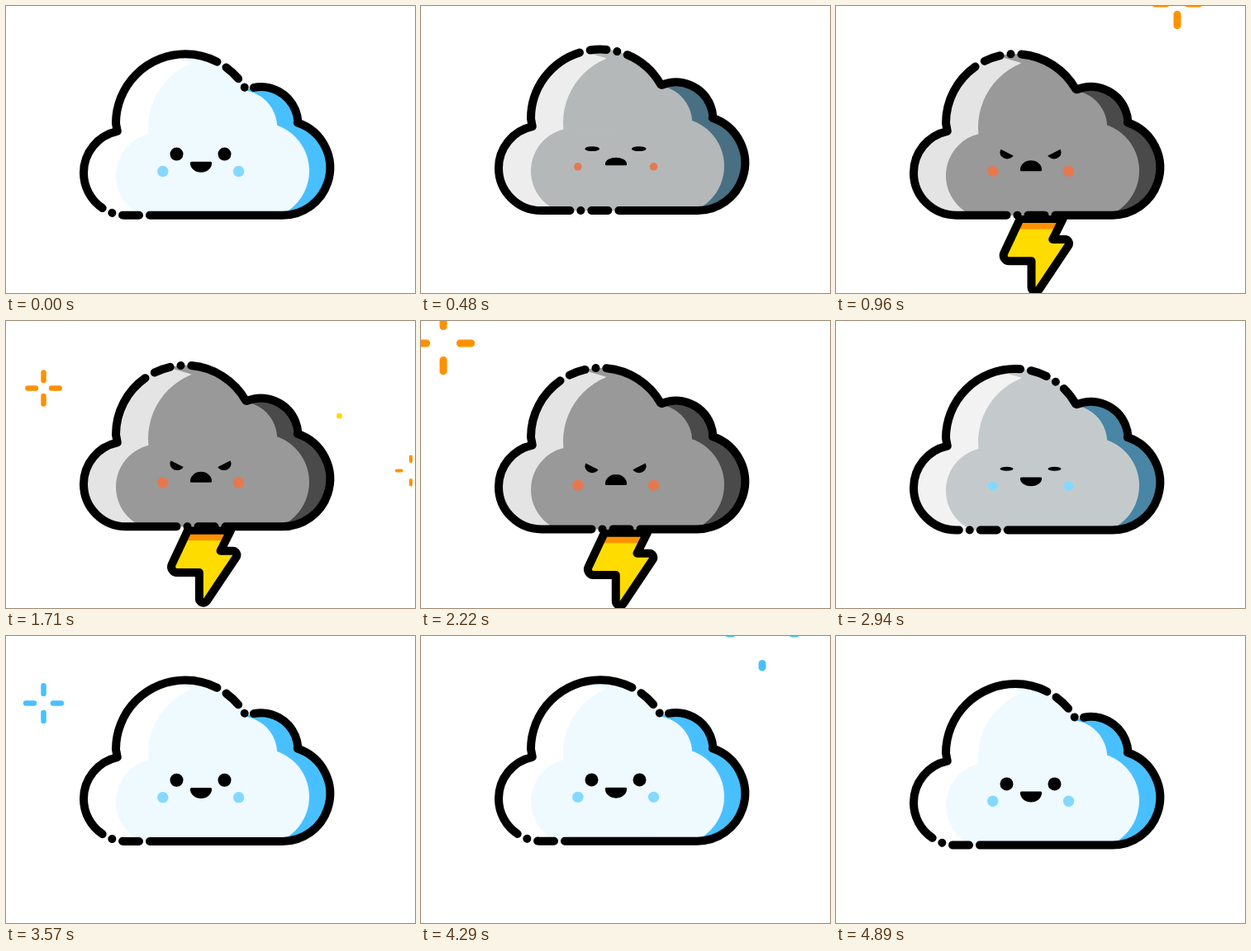
Animation, 495 px wide and 348 px high, one loop 4.92 s. Source, as an HTML page with a canvas:

```html
<!DOCTYPE html>
<html lang="en">
<head>
<meta charset="utf-8">
<title>Cloud mood</title>
<style>
html, body { margin: 0; width: 100%; height: 100%; overflow: hidden; background: #fff; }
canvas { display: block; }
</style>
</head>
<body>
<canvas id="stage" width="495" height="348"></canvas>
<script>
const ctx = document.getElementById('stage').getContext('2d');
const W = 495, H = 348, STEP = 30, FRAMES = 164;
const TAU = Math.PI * 2;
const FLOOR = 253.4; // resting height of the cloud's base line

const CALM = { left: [255, 255, 255], body: [238, 250, 255], right: [72, 192, 255] };
const ANGRY = { left: [228, 228, 228], body: [153, 153, 153], right: [74, 74, 74] };
const BLUE = '#48c0ff', ORANGE = '#ff9100', YELLOW = '#ffdc00';

const clamp = x => Math.min(1, Math.max(0, x));
const smooth = x => { x = clamp(x); return x * x * (3 - 2 * x); };
const lerp = (a, b, k) => a + (b - a) * k;
const mix = (a, b, k) => `rgb(${a.map((v, i) => Math.round(lerp(v, b[i], k)))})`;
// Rises over a..b, falls over c..d
const swell = (f, a, b, c, d) => smooth((f - a) / (b - a)) - smooth((f - c) / (d - c));

function disc(x, y, rx, ry = rx) {
  ctx.beginPath();
  ctx.ellipse(x, y, rx, ry, 0, 0, TAU);
  ctx.fill();
}

// Frames at which the cloud is lowest
const LOWS = [-35, 2, 34.5, 68.5, 101, 129, 166];

function bob(f) {
  const i = LOWS.findIndex(low => low > f);
  const phase = (f - LOWS[i - 1]) / (LOWS[i] - LOWS[i - 1]);
  return 250.8 + 3.1 * Math.cos(phase * TAU) - FLOOR;
}

function arcDeg(cx, cy, r, from, to) {
  ctx.arc(cx, cy, r, from * TAU / 360, to * TAU / 360);
}

function cloudPath() {
  ctx.beginPath();
  ctx.moveTo(334.5, 253.5);
  ctx.lineTo(145.5, 253.5);
  arcDeg(145.5, 202, 51.5, 90, 258);
  arcDeg(217, 142, 84, 180, 330.4);
  arcDeg(308.5, 142.8, 45, -112.4, -3.5);
  arcDeg(334.5, 195.8, 57.7, -71.5, 90);
  ctx.closePath();
}

function drawCloud(tone, shift) {
  const [left, body, right] = ['left', 'body', 'right'].map(k => mix(CALM[k], ANGRY[k], tone));
  ctx.save();
  cloudPath();
  ctx.clip();
  ctx.fillStyle = left;
  ctx.fillRect(80, 40, 330, 220);

  ctx.fillStyle = body;
  disc(185, 205.5, 52);
  disc(256, 147, 84);
  ctx.fillRect(184, 154, 120, 110);
  ctx.beginPath();
  ctx.moveTo(203, 62.5);
  ctx.lineTo(225, 69);
  ctx.lineTo(240, 50);
  ctx.lineTo(203, 50);
  ctx.fill();
  ctx.fillRect(224, 50, 70, 40);

  ctx.fillStyle = right;
  ctx.fillRect(291, 85, 120, 180);
  ctx.fillStyle = body;
  disc(283, 147, 45.2);
  disc(308.5, 199.5, 58.5);
  ctx.restore();

  const gap = [13, 20, 13, 0.01, 13];
  ctx.save();
  cloudPath();
  ctx.lineWidth = 10;
  ctx.lineCap = ctx.lineJoin = 'round';
  ctx.strokeStyle = '#000';
  ctx.setLineDash([301.7, ...gap, 401.4, ...gap]);
  ctx.lineDashOffset = shift - 219.5;
  ctx.stroke();
  ctx.restore();
}

function drawEye(x, side, tone) {
  const open = Math.abs(1 - 2 * tone);
  const ry = Math.max(2.5, 8 * open);
  ctx.save();
  if (tone > 0.5) {
    ctx.translate(x, 179.3 - 2 * open);
    ctx.scale(side, 1);
    const lid = lerp(-10, 0, open);
    ctx.beginPath();
    ctx.moveTo(-12, lid - 6.3);
    ctx.lineTo(12, lid + 6);
    ctx.lineTo(12, 14);
    ctx.lineTo(-12, 14);
    ctx.clip();
    disc(0.7, 0, 8.8, ry);
  } else {
    disc(x, 179.3, 8, ry);
  }
  ctx.restore();
}

function drawFace(tone, frown) {
  ctx.fillStyle = frown > 0.5 ? '#e67850' : '#85d8ff';
  const r = 6.7 * Math.max(0.2, Math.min(1, Math.abs(1 - 2 * frown) * 1.1));
  disc(189.8, 200.2, r);
  disc(281.6, 200.2, r);

  ctx.fillStyle = ctx.strokeStyle = '#000';
  drawEye(206.5, 1, tone);
  drawEye(264.5, -1, tone);

  const bend = 1 - 2 * frown;
  ctx.beginPath();
  ctx.ellipse(236, lerp(190, 198.6, frown), 11.6, Math.abs(bend) * 10, 0, 0, Math.PI, bend < 0);
  ctx.closePath();
  ctx.lineWidth = 3;
  ctx.lineJoin = 'round';
  ctx.fill();
  ctx.stroke();
}

function boltPath() {
  ctx.beginPath();
  ctx.moveTo(220, 253.5);
  ctx.arcTo(196, 304.8, 233.8, 304.8, 7);
  ctx.lineTo(233.8, 304.8);
  ctx.arcTo(233.8, 353, 283.6, 278.5, 5);
  ctx.arcTo(283.6, 278.5, 259.5, 278.5, 5);
  ctx.lineTo(259.5, 278.5);
  ctx.lineTo(272, 253.5);
  ctx.closePath();
}

function drawBolt(out, lift) {
  if (out <= 0) return;
  const sway = lift + FLOOR - 249;
  ctx.save();
  ctx.translate(0.6 * sway, sway - 100 * (1 - out));
  ctx.save();
  boltPath();
  ctx.clip();
  ctx.fillStyle = YELLOW;
  ctx.fillRect(180, 250, 120, 110);
  ctx.fillStyle = ORANGE;
  ctx.fillRect(180, 250, 120, 16);
  ctx.restore();
  boltPath();
  ctx.lineWidth = 10;
  ctx.lineJoin = 'round';
  ctx.strokeStyle = '#000';
  ctx.stroke();
  ctx.restore();
}

// Centre, scale, then the starting frames of the orange and the blue burst
const BURSTS = [
  [413, -3, 1, 26, 129.5],
  [490, 181.5, 0.46, 47, 101],
  [45.5, 81.5, 0.72, 51, 112],
  [27, 27, 1, 65.5, 148]
];

function drawBurst(x, y, size, age, color) {
  const p = age / 15;
  if (p < 0 || p >= 1) return;
  const outer = 41.5 * (1 - (1 - p) ** 2);
  const inner = Math.min(outer - 0.01, 41.5 * p ** 1.25);
  ctx.save();
  ctx.translate(x, y);
  ctx.scale(size, size);
  ctx.lineWidth = 9;
  ctx.lineCap = 'round';
  ctx.strokeStyle = color;
  ctx.beginPath();
  for (const [dx, dy] of [[1, 0], [0, 1], [-1, 0], [0, -1]]) {
    ctx.moveTo(dx * inner, dy * inner);
    ctx.lineTo(dx * outer, dy * outer);
  }
  ctx.stroke();
  ctx.restore();
}

function draw(f) {
  ctx.fillStyle = '#fff';
  ctx.fillRect(0, 0, W, H);

  for (const [x, y, size, orange, blue] of BURSTS) {
    drawBurst(x, y, size, f - orange, ORANGE);
    drawBurst(x, y, size, f - blue, BLUE);
  }
  const dot = swell(f, 51, 55, 58, 63);
  if (dot > 0) {
    ctx.fillStyle = YELLOW;
    disc(403.5, 115, 3.5 * dot);
  }

  const lift = bob(f);
  const tone = swell(f, 6, 22, 90, 106);
  const frown = swell(f, 5, 20, 86, 101);
  drawBolt(swell(f, 19, 28, 78, 88), lift);
  ctx.save();
  ctx.translate(0, lift);
  drawCloud(tone, 91.5 * swell(f, 5, 22, 88, 105));
  drawFace(tone, frown);
  ctx.restore();
}

const start = performance.now();
function tick() {
  draw(Math.floor((performance.now() - start) / STEP) % FRAMES);
  requestAnimationFrame(tick);
}
tick();
</script>
</body>
</html>
```
